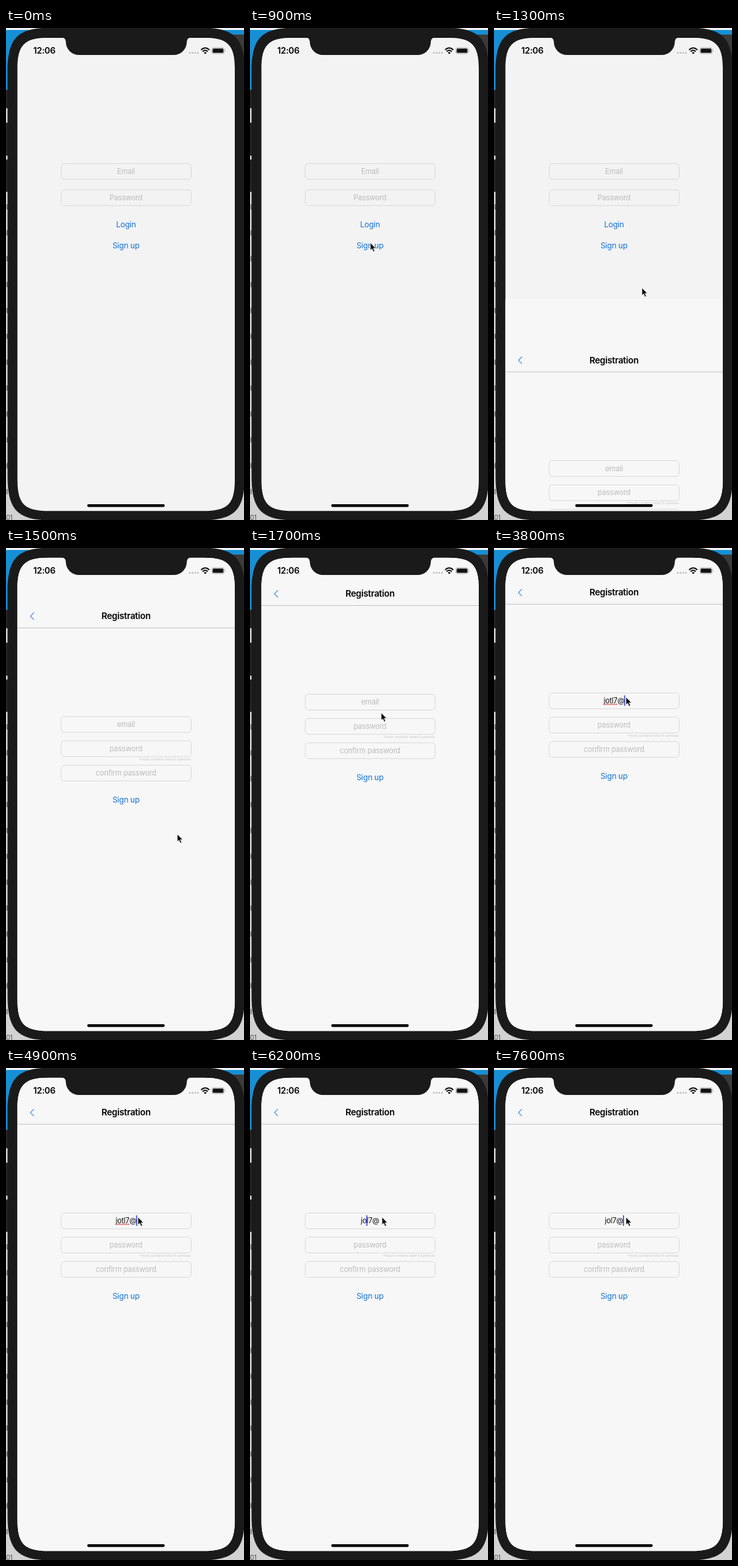
Animation of 362x748 px, one loop 8000 ms. Source, as an HTML page:

```html
<!DOCTYPE html>
<html lang="en">
<head>
<meta charset="utf-8">
<title>Registration form</title>
<style>
  html, body { margin: 0; width: 100%; height: 100%; overflow: hidden; background: #d2d2d2; }
  svg { display: block; width: 362px; height: 748px; }
  text { font-family: Inter, "Open Sans", sans-serif; font-size: 11.2px; letter-spacing: -.02em; }
  .mid { text-anchor: middle; }
  .hint { fill: #bcbcbf; }
  .link { fill: #1673d6; font-size: 12px; }
  .field { fill: none; stroke: #d9d9da; }
  .title { font-size: 13.4px; font-weight: 600; }
  .note { font-size: 5.3px; text-anchor: end; fill: #c6c6c8; letter-spacing: 0; }
</style>
</head>
<body>
<svg viewBox="0 0 362 748">
  <defs>
    <clipPath id="screen"><path id="display"/></clipPath>
  </defs>

  <!-- desktop behind the phone -->
  <rect width="362" height="748" fill="#d2d2d2"/>
  <rect width="362" height="3" fill="#f2f2f2"/>
  <rect y="3" width="362" height="91" fill="#168fd5"/>
  <rect x="345" y="10" width="17" height="84" fill="#3a3a3a"/>
  <g id="rows" fill="#555"></g>
  <text x="0" y="748" fill="#555" style="font-size:10px">01</text>

  <!-- phone body -->
  <g fill="#252525">
    <rect y="94" width="8" height="28"/>
    <rect y="144" width="8" height="50"/>
    <rect y="200" width="8" height="49"/>
  </g>
  <path id="body" fill="#1a1a1a"/>

  <g clip-path="url(#screen)">
    <rect x="17" y="15" width="332" height="720" fill="#f3f3f3"/>
    <g id="login"></g>
    <g id="sheet">
      <rect x="17" y="-25" width="332" height="800" fill="#f7f7f7"/>
      <path d="M17 85.5H349" stroke="#c3c3c4"/>
      <path d="M42.5 62.3L37.2 67.7L42.5 73.1" fill="none" stroke="#4390e8" stroke-width="1.2"/>
      <text class="mid title" x="182.5" y="72.3">Registration</text>
      <text class="note" x="281" y="286.7">*must contains least 6 symbols</text>
      <g id="form"></g>
      <text id="typed" class="mid" x="182.5" y="236" fill="#111"></text>
      <path id="spell" fill="none" stroke="#d8323c" stroke-width="1.7" stroke-dasharray="1.7 1"/>
      <rect id="caret" y="224" width="1.6" height="16" fill="#3d48dc"/>
    </g>
  </g>

  <!-- notch, status bar, home bar -->
  <path d="M84 14Q91 15 91 21A20 20 0 0 0 111 41H255A20 20 0 0 0 275 21Q275 15 282 14Z" fill="#1a1a1a"/>
  <text x="41.5" y="39" style="font-size:13.1px;font-weight:600">12:06</text>
  <g id="signal" fill="#bdbdbd"></g>
  <g fill="none" stroke="#111" stroke-width="2">
    <path d="M296.7 33.2Q303 27.4 309.3 33.2"/>
    <path d="M299 35.8Q303 32.3 307 35.8"/>
  </g>
  <path d="M300.8 37.4Q303 35.8 305.2 37.4L303 39.7Z" fill="#111"/>
  <rect x="313" y="30" width="19" height="9" rx="2.6" fill="none" stroke="#a5a5a5" stroke-width=".9"/>
  <rect x="314.3" y="31.3" width="16.4" height="6.4" rx="1.5" fill="#111"/>
  <path d="M333.2 33Q334.7 34.5 333.2 36Z" fill="#a5a5a5"/>
  <rect x="123.5" y="724" width="118" height="4.2" rx="2.1" fill="#050505"/>

  <path id="cursor" d="M0 0V11.6L2.6 9.2L4.6 13.7L6.7 12.8L4.7 8.4H8.3Z"
        fill="#0a0a0a" stroke="#fff" stroke-width=".7"/>
</svg>
<script>
const $ = id => document.getElementById(id);
const LOOP = 8000, TICK = 100, MID = 182.5;

// Box with continuous corners: they start early and stay tight in the middle
function smoothBox(left, top, right, bottom, radius) {
  const e = radius * 1.4, h = e * .775;
  return `M${left} ${top + e}c0 ${-h} ${e - h} ${-e} ${e} ${-e}H${right - e}` +
    `c${h} 0 ${e} ${e - h} ${e} ${e}V${bottom - e}` +
    `c0 ${h} ${h - e} ${e} ${-e} ${e}H${left + e}` +
    `c${-h} 0 ${-e} ${h - e} ${-e} ${-e}Z`;
}

const field = (y, hint, id = "") =>
  `<rect class="field" x="84" y="${y}" width="197.5" height="24" rx="4.5"/>
   <text class="mid hint" id="${id}" x="${MID}" y="${y + 15.8}">${hint}</text>`;
const link = (y, label) => `<text class="mid link" x="${MID}" y="${y}">${label}</text>`;

$("body").setAttribute("d", smoothBox(2.4, -.5, 363, 748.5, 48));
$("display").setAttribute("d", smoothBox(17.4, 14.7, 348, 734.3, 34));
$("login").innerHTML = field(206, "Email") + field(246, "Password") +
  link(302.7, "Login") + link(334.7, "Sign up");
$("form").innerHTML = field(220.4, "email", "emailHint") + field(257.2, "password") +
  field(294.2, "confirm password") + link(350.9, "Sign up");
$("signal").innerHTML = [0, 1, 2, 3].map(i =>
  `<circle cx="${279.6 + i * 4.1}" cy="37.8" r="1.4"/>`).join("");
$("rows").innerHTML = Array.from({ length: 12 }, (_, i) =>
  `<rect x="1" y="${268 + i * 39.35}" width="1.2" height="8"/>`).join("");

// [time, x, y] of the pointer tip
const pointer = [
  [100, 354, 504], [200, 322, 497], [300, 291, 480], [400, 291, 480],
  [900, 183, 326.5], [1100, 183, 326.5], [1200, 188, 338], [1300, 225, 395],
  [1400, 258, 436], [1500, 260.5, 435], [1700, 199.5, 250.5], [1800, 200.8, 233.5],
  [2000, 200.8, 233.5], [2100, 200.8, 229], [2200, 200.8, 226.8], [LOOP, 200.8, 226.8]
];

// [time, text, caret position, caret opacity]
const WRONG = "jotl7@", FIXED = "jol7@";
const typing = [
  [0, "", 0, 0], [2100, "", 0, .5], [2200, "", 0, 1],
  ...[2700, 2800, 2900, 3100, 3300, 3800].map((t, i) => [t, WRONG.slice(0, i + 1), i + 1, 1]),
  [4400, WRONG, 6, .4], [4500, WRONG, 6, 0], [4900, WRONG, 6, 1],
  [5200, WRONG, 5, 1], [5300, WRONG, 3, 1], [5500, WRONG, 2, 1], [5700, WRONG, 3, 1],
  [6200, FIXED, 2, 1], [6700, FIXED, 2, .65], [6800, FIXED, 2, .3], [6900, FIXED, 2, 0],
  [7200, FIXED, 2, 1], [7300, FIXED, 3, 1], [7500, FIXED, 4, 1], [7600, FIXED, 5, 1]
];

function pointerAt(t) {
  const i = pointer.findIndex(p => p[0] >= t);
  const b = pointer[i], a = pointer[Math.max(0, i - 1)];
  const k = b === a ? 0 : (t - a[0]) / (b[0] - a[0]);
  return [1, 2].map(n => a[n] + (b[n] - a[n]) * k);
}

// Critically damped spring from below the screen
function sheetOffset(t) {
  const x = Math.max(0, t - 1218) * .0169;
  return t >= 1800 ? 0 : 733 * Math.exp(-x) * (1 + x);
}

function drawTyping(t) {
  const [, text, index, alpha] = typing.findLast(s => s[0] <= t);
  const typed = $("typed"), hint = $("emailHint");
  typed.textContent = text;
  hint.style.visibility = text ? "hidden" : "inherit";
  const start = MID - (text ? typed : hint).getComputedTextLength() / 2;
  const along = n => start + (n ? typed.getSubStringLength(0, n) : 0);
  $("caret").setAttribute("x", along(index) - (text ? .5 : 1.3));
  $("caret").setAttribute("opacity", alpha);
  $("spell").setAttribute("d", text === WRONG ? `M${start} 237.7H${along(5)}` : "");
}

function draw(time) {
  const t = Math.floor(time % LOOP / TICK) * TICK;
  const [x, y] = pointerAt(t);
  $("cursor").setAttribute("transform", `translate(${x} ${y})`);
  $("cursor").style.visibility = t < 100 ? "hidden" : "visible";
  $("sheet").setAttribute("transform", `translate(0 ${sheetOffset(t)})`);
  $("sheet").style.visibility = t < 1200 ? "hidden" : "visible";
  drawTyping(t);
}

const began = performance.now();
function frame() {
  draw(performance.now() - began);
  requestAnimationFrame(frame);
}
frame();
</script>
</body>
</html>
```
